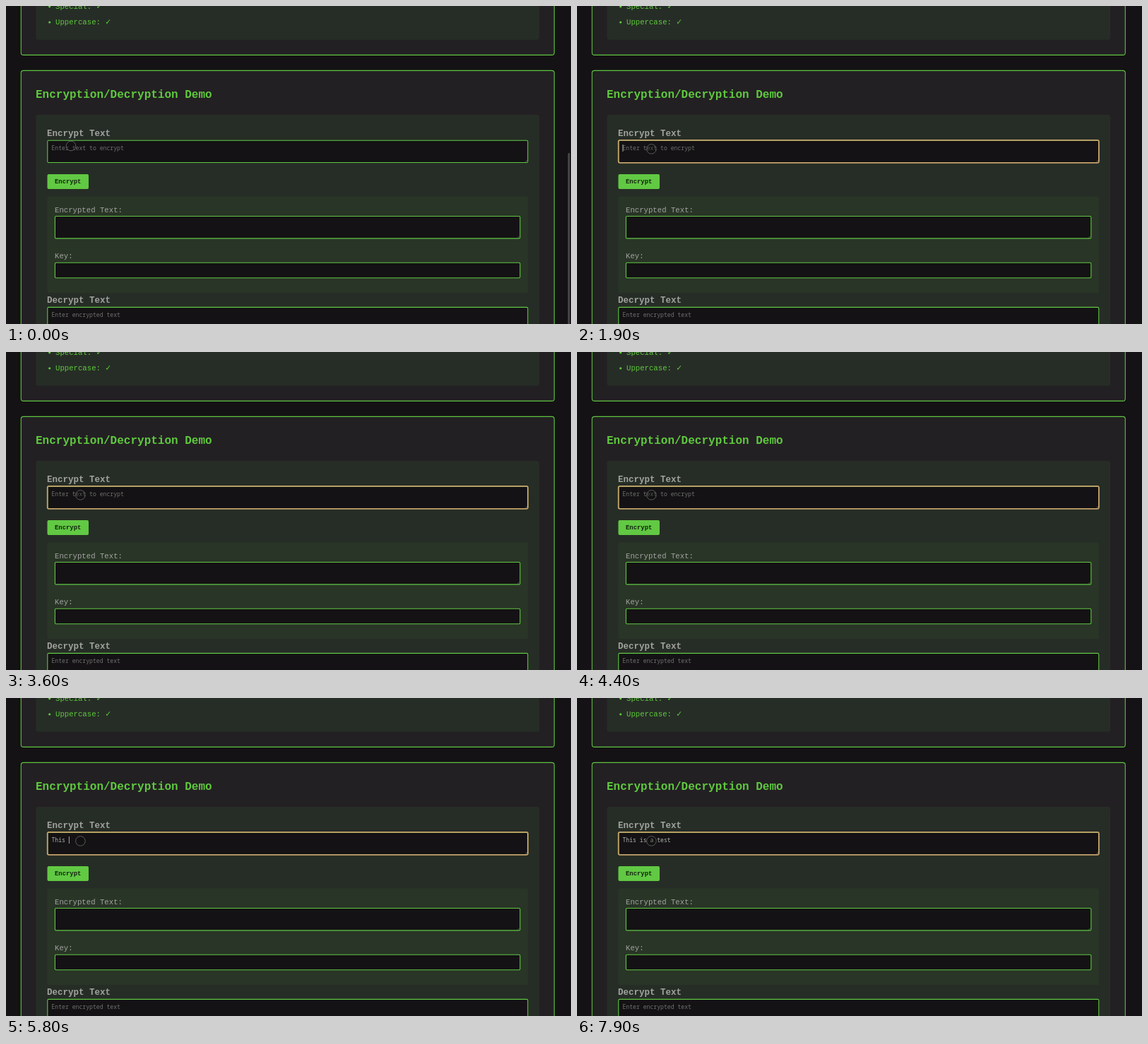
Recreate the animation shown at these times as an HTML page. Size 800 by 450 pixels, loop 8 s.

```html
<!DOCTYPE html>
<html lang="en">
<head>
<meta charset="utf-8">
<title>Encryption demo</title>
<style>
  html, body { margin: 0; width: 100%; height: 100%; overflow: hidden; background: #141214; }
  svg { display: block; width: 100vw; height: 100vh; }
  text { white-space: pre; font-family: "Liberation Mono", "Courier New", monospace; font-size: 10.67px; fill: #a2a3a1; }
  .bold { font-weight: 700; }
  .title { font-size: 16px; fill: #5fc83e; }
  .label { font-size: 12.5px; }
  .item { fill: #5fc83e; }
  .check { font-family: "DejaVu Sans", sans-serif; }
  .button { font-size: 8.89px; fill: #14230f; }
  .input { font-family: "Noto Sans Mono", "DejaVu Sans Mono", monospace; font-size: 8.14px; fill: #b4b4b3; }
  .hint { fill: #70716f; }
  .card { fill: #232023; stroke: #5ec440; stroke-width: 1.1; }
  .panel { fill: #262d26; }
  .result { fill: #293526; }
  .field { fill: #141214; stroke: #60c843; stroke-width: 1.1; }
</style>
</head>
<body>
<svg viewBox="0 0 800 450">
  <rect width="800" height="450" fill="#141214"/>
  <rect class="card" x="21.3" y="-20" width="755" height="89.4" rx="3.5"/>
  <rect class="panel" x="42.5" y="-20" width="712.5" height="67.8" rx="3"/>
  <g id="items"></g>

  <rect class="card" x="21.3" y="91.4" width="755" height="400" rx="3.5"/>
  <text class="title bold" x="42" y="130">Encryption/Decryption Demo</text>
  <rect class="panel" x="42.5" y="154" width="712.5" height="340" rx="3"/>

  <text class="label bold" x="58" y="183.5">Encrypt Text</text>
  <rect class="field" x="58.8" y="190.2" width="680" height="31.3" rx="1.5"/>
  <path d="M735.5 220.5l2.5-2.5" stroke="#777" stroke-width=".7"/>
  <rect id="focus" x="58.7" y="189.9" width="680.2" height="31.9" rx="2" fill="none" stroke="#c5a26b" stroke-width="1.8"/>
  <text id="entry" class="input" x="64.4" y="203.9"></text>
  <rect id="caret" y="196" width=".9" height="10" fill="#b8b8b8"/>

  <rect x="58.5" y="238" width="58.5" height="21" rx="2" fill="#61c943"/>
  <text class="button bold" x="69" y="251.2">Encrypt</text>

  <rect class="result" x="58.5" y="269.5" width="680.5" height="136.5" rx="2.5"/>
  <text x="69" y="291.8">Encrypted Text:</text>
  <rect class="field" x="69.4" y="297.5" width="658.5" height="31.4" rx="1.5"/>
  <path d="M724.5 328l2.5-2.5" stroke="#777" stroke-width=".7"/>
  <text x="69" y="357.3">Key:</text>
  <rect class="field" x="69.4" y="363.2" width="658.5" height="21.6" rx="1.5"/>

  <text class="label bold" x="58" y="419.5">Decrypt Text</text>
  <rect class="field" x="58.8" y="426.4" width="680" height="40" rx="1.5"/>
  <text class="input hint" x="64.4" y="440">Enter encrypted text</text>

  <rect id="scrollbar" x="795.6" y="208" width="2.8" height="250" rx="1.4" fill="#4a484a"/>
  <circle id="pointer" r="6.8" fill="#0b0d0c" fill-opacity=".28" stroke="#626362" stroke-width=".9"/>
</svg>
<script>
  const LOOP = 8000, STEP = 100, BLINK = 500, CHAR_WIDTH = 4.884;
  const FOCUS_AT = 1800;
  const MESSAGE = "This is a test";
  const $ = id => document.getElementById(id);
  const clamp = v => Math.max(0, Math.min(1, v));
  const ease = v => v * v * (3 - 2 * v);
  const keyTime = i => i < 10 ? 5000 + i * 178 : 6800 + (i - 10) * 150;

  $("items").innerHTML = [["Special:", 4], ["Uppercase:", 26.2]].map(([name, y]) => `
    <circle cx="61.7" cy="${y - 3.2}" r="1.6" fill="#5fc83e"/>
    <text class="item" x="70" y="${y}">${name} <tspan class="check">✓</tspan></text>`).join("");

  function render(t) {
    const move = ease(clamp(t / 800));
    $("pointer").setAttribute("cx", 92 + 13.4 * move);
    $("pointer").setAttribute("cy", 198 + 4.4 * move);
    $("scrollbar").setAttribute("opacity", 1 - clamp((t - 200) / 300));

    let typed = 0;
    while (typed < MESSAGE.length && t >= keyTime(typed)) typed++;
    $("entry").textContent = typed ? MESSAGE.slice(0, typed) : "Enter text to encrypt";
    $("entry").classList.toggle("hint", !typed);

    const focused = t >= FOCUS_AT;
    const lastInput = typed ? keyTime(typed - 1) : FOCUS_AT;
    const caretOn = focused && Math.floor((t - lastInput) / BLINK) % 2 === 0;
    $("focus").setAttribute("opacity", focused ? 1 : 0);
    $("caret").setAttribute("opacity", caretOn ? 1 : 0);
    $("caret").setAttribute("x", 64.5 + typed * CHAR_WIDTH);
  }

  const start = performance.now();
  function frame() {
    const t = (performance.now() - start) % LOOP;
    render(Math.floor(t / STEP) * STEP);
    requestAnimationFrame(frame);
  }
  frame();
</script>
</body>
</html>
```
